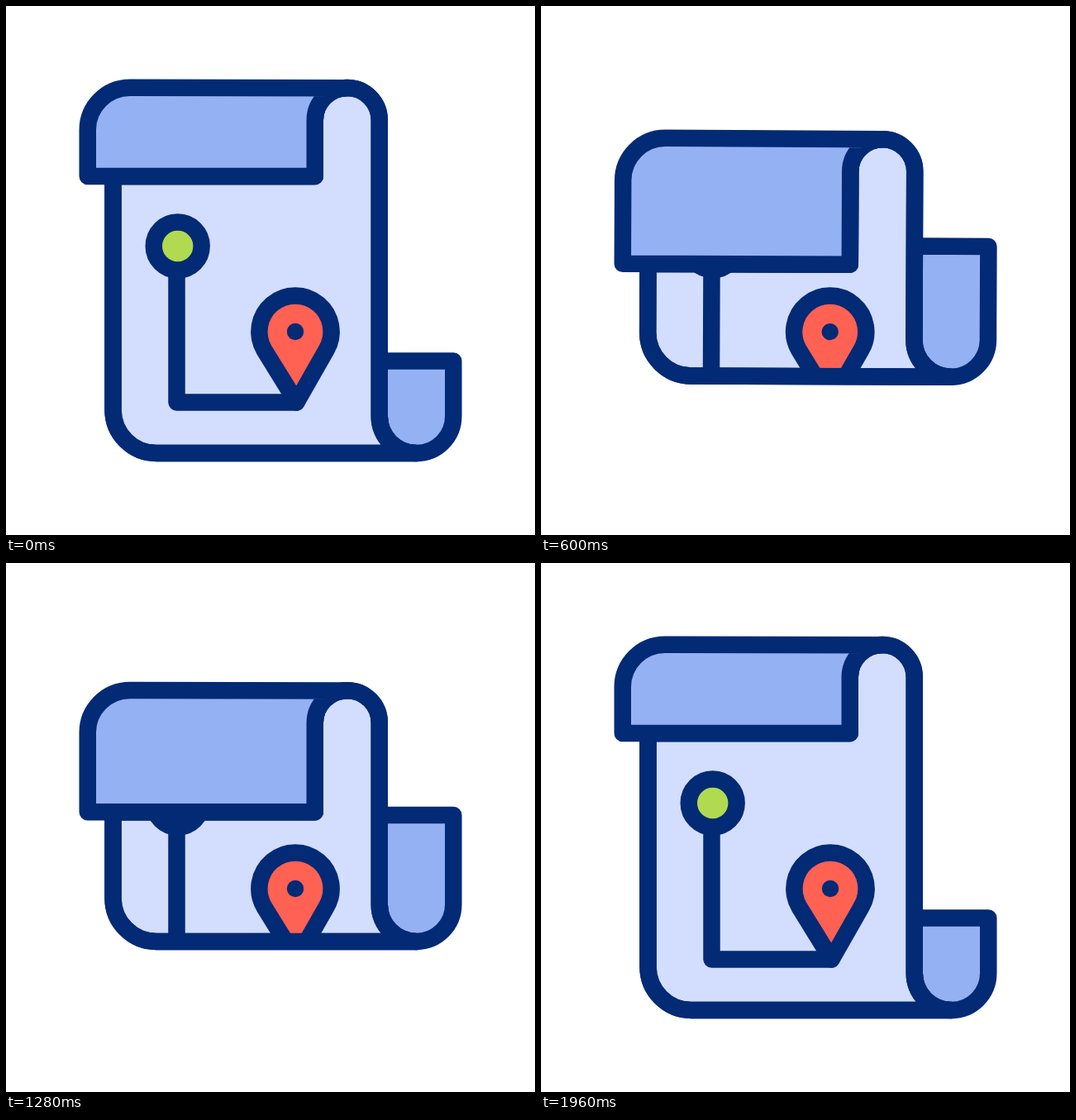
An HTML page with a canvas for the animation above (2000 ms loop, 640 by 640 pixels).

```html
<!DOCTYPE html>
<html lang="en">
<head>
<meta charset="utf-8">
<title>Map scroll</title>
<style>
html, body { margin: 0; width: 100%; height: 100%; overflow: hidden; background: #fff; }
canvas { display: block; width: 640px; height: 640px; }
</style>
</head>
<body>
<canvas id="stage" width="640" height="640"></canvas>
<script>
const ctx = document.getElementById('stage').getContext('2d');
const NAVY = '#032a75', LIGHT = '#d3ddfd', BLUE = '#94b1f3', GREEN = '#b1da50', RED = '#ff6153';
const LOOP = 2000, STEP = 40;

// [time in ms, value], eased between neighbours
const FOLD = [[0, 0], [513, 1], [1170, 1], [1712, 0], [LOOP, 0]];
const SWING = [[0, 0], [240, 10], [480, -10], [714, 9.7], [1016, -5], [1210, 0], [LOOP, 0]];

function track(keys, t) {
  const i = keys.findIndex(k => k[0] > t);
  const [t0, a] = keys[i - 1], [t1, b] = keys[i];
  const s = (t - t0) / (t1 - t0);
  return a + (b - a) * s * s * (3 - 2 * s);
}

function shape(d, fill) {
  const path = new Path2D(d);
  if (fill) {
    ctx.fillStyle = fill;
    ctx.fill(path);
  }
  ctx.stroke(path);
}

function disc(x, y, r, fill, outlined) {
  ctx.beginPath();
  ctx.arc(x, y, r, 0, 2 * Math.PI);
  ctx.fillStyle = fill;
  ctx.fill();
  if (outlined) ctx.stroke();
}

function drawRoute() {
  shape('M206.5 300V479.5H351.5');
  disc(207.7, 290.5, 28.95, GREEN, true);
  shape('M351.5 479.5L312.5 416.3A43.6 43.6 0 1 1 387.5 416.3Z', RED);
  disc(350, 394, 10.2, NAVY);
}

function draw(t) {
  const fold = track(FOLD, t);
  const top = 99 + 61.8 * fold;
  const hem = 206 + 106.6 * fold;
  const base = 541 - 93 * fold;
  const tail = 429.5 - 139.5 * fold;

  ctx.setTransform(1, 0, 0, 1, 0, 0);
  ctx.fillStyle = '#fff';
  ctx.fillRect(0, 0, 640, 640);
  ctx.translate(320, 320);
  ctx.rotate(track(SWING, t) * Math.PI / 180);
  ctx.translate(-320, -320);
  ctx.strokeStyle = NAVY;
  ctx.lineWidth = 20.5;
  ctx.lineJoin = ctx.lineCap = 'round';

  // Lower curl
  shape(`M451.75 ${tail}H541.25V${base - 44.75}A44.75 44.75 0 0 1 451.75 ${base - 44.75}Z`, BLUE);

  // Sheet, with the route cut off at its edges
  const sheet = `M129.5 ${hem}V${base - 52.5}A52.5 52.5 0 0 0 182 ${base}H496.5
    A44.75 44.75 0 0 1 451.75 ${base - 44.75}V${top + 39}
    A39 39 0 0 0 373.75 ${top + 39}V${hem}Z`;
  shape(sheet, LIGHT);
  ctx.save();
  ctx.clip(new Path2D(sheet));
  drawRoute();
  ctx.restore();
  shape(sheet);

  // Upper curl
  shape(`M98.75 ${hem}V${top + 51}A51.25 51.25 0 0 1 150 ${top - 0.3}L412.75 ${top + 0.2}
    A39 39 0 0 0 373.75 ${top + 39}V${hem}Z`, BLUE);
}

function tick() {
  const t = performance.now() % LOOP;
  draw(Math.floor(t / STEP) * STEP);
  requestAnimationFrame(tick);
}
tick();
</script>
</body>
</html>
```
